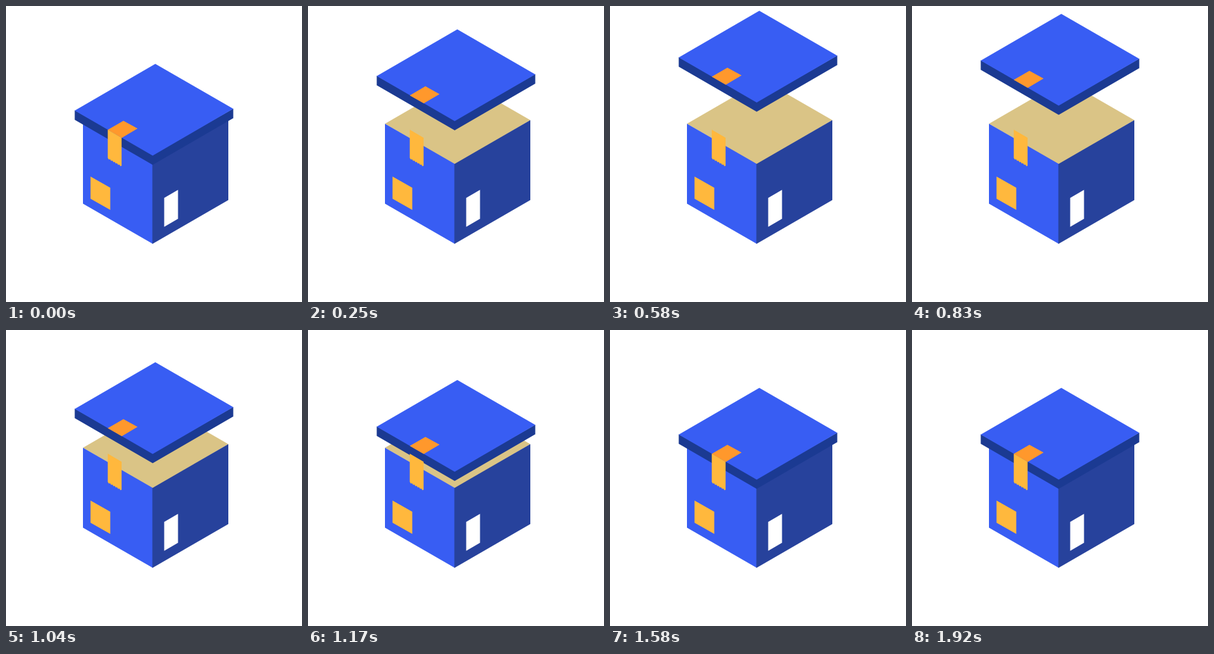
Write an HTML page that moves like this. It is 450x450 px and loops after 1.96 s.

```html
<!DOCTYPE html>
<html lang="en">
<head>
<meta charset="utf-8">
<title>Opening box</title>
<style>
  html, body { margin: 0; width: 100%; height: 100%; overflow: hidden; background: #fff; }
  svg { display: block; width: 100vw; height: 100vh; }
</style>
</head>
<body>
<svg viewBox="0 0 450 450">
  <path fill="#dac486" d="M117 179L232 112.5L338 173.5L223 241Z"/>
  <path fill="#385df3" d="M117 179L223 240V361.5L117 300.5Z"/>
  <path fill="#27429c" d="M222.5 240.2L338 173.5V295L222.5 361.7Z"/>
  <path fill="#ffb83d" d="M128.5 259.3L158.5 276.3V310L128.5 293Z"/>
  <path fill="#fff" d="M240.5 291.7L261.5 279.5V323.5L240.5 335.7Z"/>
  <g id="lid">
    <path fill="#1b3a92" d="M104.5 158.5L223.5 226L345.5 156V170.5L223 241.5L104.5 173Z"/>
    <path fill="#385df3" d="M227 88L345.5 156.3L223 227.5L104.5 159Z"/>
    <path fill="#ff982c" d="M178.5 174.5L200 186.3L176 200.5L154.7 188.3Z"/>
  </g>
  <path id="tape" fill="#ffb83d"/>
</svg>
<script>
const LOOP = 1960, FPS = 24, LIFT = 76;
const lid = document.getElementById('lid');
const phase = (t, start, length) => Math.min(1, Math.max(0, (t - start) / length));

function backOut(u) {
  const v = u - 1;
  return 1 + 3 * v ** 3 + 2 * v ** 2;
}

function bounceOut(u) {
  const k = 7.5625, x = u * 2.75;
  const hop = (mid, base) => k * (u - mid / 2.75) ** 2 + base;
  if (x < 1) return hop(0, 0);
  if (x < 2) return hop(1.5, 0.75);
  if (x < 2.5) return hop(2.25, 0.9375);
  return hop(2.625, 0.984375);
}

// Torn lower edge of the tape
let edge = 'M154.7 188V231';
for (let i = 0; i < 6; i++) {
  const x = 154.7 + i * 3.5, y = 231 + i * 2;
  edge += `L${x + 1.75} ${y + 2.6}L${x + 3.5} ${y + 2}`;
}
document.getElementById('tape').setAttribute('d', edge + 'V200.2Z');

function draw(now) {
  const step = Math.floor((now % LOOP + 5) * FPS / 1000);
  const t = step * 1000 / FPS;
  const rise = backOut(phase(t, 151, 551));
  const fall = bounceOut(phase(t, 867, 688));
  lid.setAttribute('transform', `translate(0 ${-LIFT * (rise - fall)})`);
  requestAnimationFrame(draw);
}

const start = performance.now();
const tick = draw;
draw = now => tick(Math.max(0, now - start));
draw(start);
</script>
</body>
</html>
```
